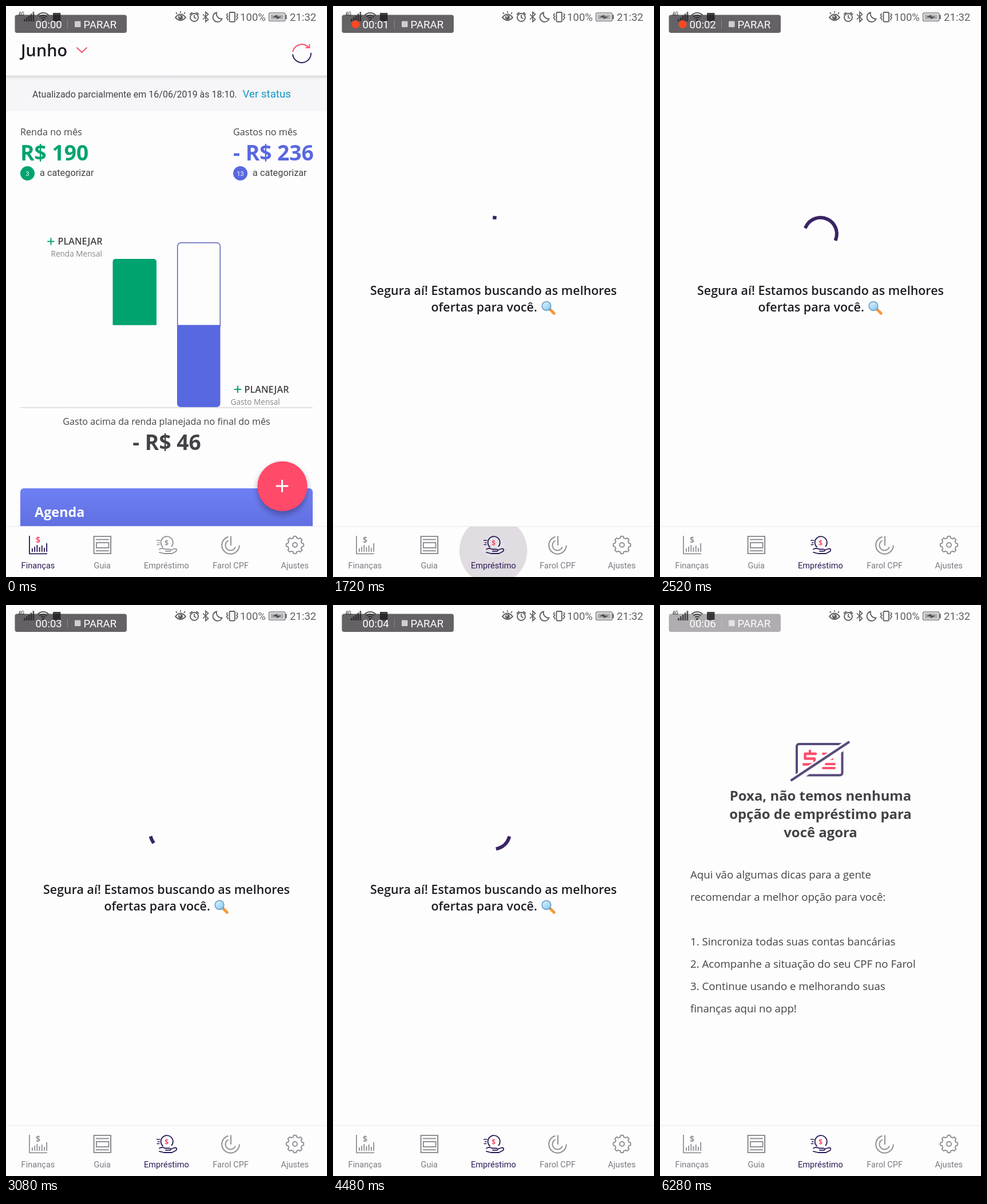
An HTML page with a canvas for the animation above (6.32 s loop, 561 px wide and 998 px high).

```html
<!DOCTYPE html>
<html lang="pt-BR">
<head>
<meta charset="utf-8">
<title>Finanças</title>
<style>
html, body { margin: 0; width: 100%; height: 100%; overflow: hidden; background: #fefdfe; }
canvas { display: block; width: 561px; height: 998px; }
</style>
</head>
<body>
<canvas id="stage"></canvas>
<script>
const W = 561, H = 998, LOOP = 6320, STEP = 40;
const PAGE_AT = 1680, SPIN_AT = 1700, STALL_AT = 4520, RESULT_AT = 4600;
const OPEN = '"Open Sans", "Noto Sans", sans-serif';
const ROBOTO = 'Roboto, "Noto Sans", sans-serif';
const PAPER = '#fefdfe', INK = '#444246', NAVY = '#2c1a55', PINK = '#ff4a69';
const GREEN = '#00a36f', BLUE = '#5868e0', GRAY = '#919095', STATUS = '#625f64';

const canvas = document.getElementById('stage');
const dpr = window.devicePixelRatio || 1;
canvas.width = W * dpr;
canvas.height = H * dpr;
const c = canvas.getContext('2d');
c.scale(dpr, dpr);

const clamp = v => Math.max(0, Math.min(1, v));

function text(str, x, y, size, color = INK, family = OPEN, weight = 400, align = 'left') {
  c.font = `${weight} ${size}px ${family}`;
  c.textAlign = align;
  c.fillStyle = color;
  c.fillText(str, x, y);
}
function line(d, color, width = 2, cap = 'butt') {
  c.strokeStyle = color;
  c.lineWidth = width;
  c.lineCap = cap;
  c.lineJoin = cap === 'butt' ? 'miter' : 'round';
  c.stroke(new Path2D(d));
}
function fill(d, color) {
  c.fillStyle = color;
  c.fill(new Path2D(d));
}
function rect(x, y, w, h, color, r = 0) {
  c.beginPath();
  c.roundRect(x, y, w, h, r);
  c.fillStyle = color;
  c.fill();
}
function frame(x, y, w, h, color, width, r = 0) {
  c.beginPath();
  c.roundRect(x, y, w, h, r);
  c.strokeStyle = color;
  c.lineWidth = width;
  c.stroke();
}
function disc(x, y, r, color) {
  c.beginPath();
  c.arc(x, y, r, 0, 7);
  c.fillStyle = color;
  c.fill();
}
function arc(x, y, r, from, to, color, width = 2, cap = 'butt') {
  const rad = Math.PI / 180;
  c.beginPath();
  c.arc(x, y, r, from * rad, to * rad);
  c.strokeStyle = color;
  c.lineWidth = width;
  c.lineCap = cap;
  c.stroke();
}
function plus(x, y, r, color, width) {
  line(`M${x - r} ${y}H${x + r}M${x} ${y - r}V${y + r}`, color, width);
}

function statusBar() {
  text('4G', 21.5, 17, 8.5, '#4a484c', ROBOTO, 500);
  for (let i = 0; i < 5; i++) rect(31 + i * 3.9, 23 - i * 3.2, 2.7, 4 + i * 3.2, '#5a585c');
  for (const r of [13, 9, 5]) arc(65, 25, r, -137, -43, '#5a585c', 2);
  disc(65, 24.5, 2, '#5a585c');
  rect(82, 12, 13.5, 14.5, '#444246', 1);

  line('M296 20Q305 9 314 20Q305 30 296 20Z', STATUS, 1.9);
  disc(305, 20, 4, STATUS);
  disc(304, 18.5, 1.2, PAPER);
  line('M299 14L297 11M305 12V9M311 14L313 11', STATUS, 1.6);

  arc(329, 20, 7, 0, 360, STATUS, 1.9);
  line('M329 15.5V20.5L332.5 22M321 15L325.5 11M337 15L332.5 11', STATUS, 1.8);
  line('M344 14.5L353.5 23.5L349 27.5V10.5L353.5 14.5L344 23.5', STATUS, 1.7);
  line('M368 11.5A8.2 8.2 0 1 0 377.5 22.5A9 9 0 0 1 368 11.5Z', STATUS, 1.9);

  frame(390.5, 11, 9.5, 16.5, STATUS, 1.9, 1.5);
  line('M387.5 13L385.5 15.5L387.5 18L385.5 20.5L387.5 23V25M403 13L405 15.5L403 18L405 20.5L403 23V25', STATUS, 1.7);

  text('100%', 409, 26, 18.6, STATUS, ROBOTO);
  frame(459.7, 12.2, 28, 14, STATUS, 1.3, 2);
  rect(462, 14.3, 23.5, 9.8, '#b5b3b7');
  rect(488.5, 15.5, 2.2, 7.5, STATUS);
  fill('M465 19.5L474 15.5V18.2L482 18.8L473 23V20.2Z', '#4f4d51');
  text('21:32', 496, 26, 18.6, STATUS, ROBOTO);
}

// Only the plate fades; its white text keeps full strength.
function recorder(t) {
  const phase = (t + 60) % 1010, sec = Math.floor((t + 60) / 1010);
  c.globalAlpha = clamp(1 - (t - 6140) / 290);
  rect(15.5, 15.5, 195.5, 31.5, 'rgba(32,29,32,.69)', 4);
  if (phase > 500) disc(39.5, 32, 7, '#ff4722');
  c.globalAlpha = 1;
  text('00:0' + sec, 51.5, 38.5, 18.6, '#fff', ROBOTO);
  rect(107, 24, 1, 15, 'rgba(255,255,255,.25)');
  rect(120, 26.5, 10.5, 10.5, t > 6140 ? '#e4e2e5' : '#cfcdd0', 1);
  text('PARAR', 135.5, 38.5, 18.6, '#fff', ROBOTO);
}

function summary(x, title, amount, count, color) {
  text(title, x, 226, 16.2);
  text(amount, x, 270, 37.2, color, OPEN, 700);
  disc(x + 12.5, 292.5, 12.5, color);
  text(count, x + 12.5, 296.5, 10.8, '#fff', ROBOTO, 400, 'center');
  text('a categorizar', x + 34, 297, 16.3, INK, ROBOTO);
}

function financePage() {
  text('Junho', 26, 88, 28.8, '#1f1d22', OPEN, 600);
  line('M123.5 72.5L132.5 81L141.5 72.5', '#f2566f', 2);
  arc(517, 83, 16, 190, 322, PINK, 1.9);
  line('M530.3 66.5V72.8H523.5', PINK, 1.9);
  arc(517, 83, 16, -4, 176, NAVY, 1.9);

  rect(0, 122, W, 62, '#f6f5f7');
  const shade = c.createLinearGradient(0, 121, 0, 128);
  shade.addColorStop(0, '#d6d4d8');
  shade.addColorStop(1, '#f6f5f7');
  rect(0, 121.5, W, 6.5, shade);
  text('Atualizado parcialmente em 16/06/2019 às 18:10.', 46, 160, 16.05, INK, ROBOTO);
  text('Ver status', 413.5, 160, 18.7, '#0f98c6', ROBOTO);

  summary(25, 'Renda no mês', 'R$ 190', '3', GREEN);
  summary(397, 'Gastos no mês', '- R$ 236', '13', BLUE);

  plus(78.5, 411.5, 6.2, GREEN, 2);
  text('PLANEJAR', 90.5, 417, 16.2, INK, OPEN, 600);
  text('Renda Mensal', 168, 438, 13.6, '#88868a', OPEN, 400, 'right');
  rect(186.5, 442, 76.5, 115.7, GREEN, [5, 5, 0, 0]);
  frame(299.7, 413.8, 74.6, 146, '#5a63b5', 1.5, [6, 6, 0, 0]);
  rect(299, 557.5, 75.5, 143.5, BLUE, [0, 0, 6, 6]);
  plus(405, 670, 6.2, GREEN, 2);
  text('PLANEJAR', 416.5, 676, 16.2, INK, OPEN, 600);
  text('Gasto Mensal', 392.5, 696.5, 13.6, '#88868a');
  rect(25, 701.2, 511, 1.6, '#d9d7dc');

  text('Gasto acima da renda planejada no final do mês', 280.5, 732, 16.15, INK, OPEN, 400, 'center');
  text('- R$ 46', 281, 776, 37.2, INK, OPEN, 700, 'center');

  const card = c.createLinearGradient(0, 843, 0, 912);
  card.addColorStop(0, '#6f80f5');
  card.addColorStop(1, '#5f6fe0');
  rect(25, 843, 511, 80, card, 6);
  text('Agenda', 50, 892.5, 23.4, '#fff', OPEN, 700);

  c.save();
  c.shadowColor = 'rgba(30,20,60,.4)';
  c.shadowBlur = 11 * dpr;
  c.shadowOffsetY = 6 * dpr;
  disc(483, 839.3, 43.6, PINK);
  c.restore();
  plus(482.5, 839, 10.8, '#fff', 3);
}

// Eased share of a cubic with control heights 0 and 1.
function ease(x, x0, x1, x2, x3) {
  if (x <= x0) return 0;
  if (x >= x3) return 1;
  let lo = 0, hi = 1, u;
  for (let i = 0; i < 24; i++) {
    u = (lo + hi) / 2;
    const v = 1 - u;
    const at = x0 * v * v * v + 3 * x1 * u * v * v + 3 * x2 * u * u * v + x3 * u * u * u;
    if (at < x) lo = u; else hi = u;
  }
  return u * u * (3 - 2 * u);
}

function spinner(t) {
  if (t < SPIN_AT) return;
  const time = Math.min(t, STALL_AT);
  const run = time - 1655 - 50 * clamp(1 - (time - 1720) / 80);
  const p = run % 1333 / 1333;
  const turn = run * 720 / 4444 + p * 90 - 90;
  const head = 270 * ease(p, 0, .2, .1, .5);
  const tail = 270 * ease(p, .5, .7, .6, 1);
  arc(280.5, 398.2, 28.4, turn + tail, turn + Math.max(head, tail + 1), '#3a2463', 6, 'square');
}

function loadingPage(t) {
  spinner(t);
  text('Segura aí! Estamos buscando as melhores', 280.5, 505, 21.45, '#1f1d22', OPEN, 600, 'center');
  text('ofertas para você.', 171.5, 534, 21.45, '#1f1d22', OPEN, 600);
  line('M379 530L386.3 537.2', '#f39a35', 5, 'round');
  line('M377 528L380 531', '#8a98a8', 3);
  disc(373, 524.3, 8.6, '#6c9fc8');
  const glass = c.createLinearGradient(368, 518, 378, 531);
  glass.addColorStop(0, '#d4f0fd');
  glass.addColorStop(1, '#8ccbf2');
  disc(373, 524.3, 6.9, glass);
}

function resultPage() {
  const violet = '#584a7a';
  frame(239, 243, 79.5, 54.5, violet, 4, 4);
  line('M272 260H253.5V268.5H270V278.5H251M262 255V260M262 278.5V283', '#fb4f6b', 4.4, 'round');
  line('M285 260H301M285 269H301M290 278H305M285 285H305', '#fb4f6b', 4, 'round');
  line('M228 310L333 239', PAPER, 13);
  line('M228.5 307L331 239', violet, 4.2);

  ['Poxa, não temos nenhuma', 'opção de empréstimo para', 'você agora'].forEach((s, i) =>
    text(s, 280.5, 342 + i * 32.2, 23.9, INK, OPEN, 700, 'center'));
  ['Aqui vão algumas dicas para a gente',
    'recomendar a melhor opção para você:', '',
    '1. Sincroniza todas suas contas bancárias',
    '2. Acompanhe a situação do seu CPF no Farol',
    '3. Continue usando e melhorando suas',
    'finanças aqui no app!'].forEach((s, i) => text(s, 53, 478 + i * 39, 18.65));
}

function chartIcon(ink, accent) {
  line('M41 926V957.3H72', ink, 1.8);
  [6, 9, 12, 8, 11, 7, 15].forEach((h, i) => rect(45 + i * 4.2, 954 - h, 1.9, h, ink));
  text('$', 56, 937.5, 14, accent, OPEN, 700, 'center');
}
function guideIcon(ink) {
  frame(153.6, 927, 29.5, 30, ink, 2.2);
  line('M157 932.5H180M157 952.3H180', ink, 2);
  frame(158, 938, 21.5, 9, ink, 2);
}
function loanIcon(ink, accent) {
  line('M274.5 946A10.6 10.6 0 1 1 289 945', ink, 1.8);
  line('M263 934H269.5M265 938H268.5M263.5 941.5H268.5', ink, 1.6);
  text('$', 280.7, 942.5, 12, accent, OPEN, 700, 'center');
  line('M268 949.5Q273 946.5 278 949.5H286Q290 951 287 952.8H279M289 950.5L295 948.5Q300 948.8 297.5 953L290 957H276L268 954.8', ink, 1.8, 'round');
}
function dialIcon(ink) {
  arc(392.5, 942.5, 15.3, 0, 255, ink, 2);
  arc(392.5, 942.5, 9, 20, 245, ink, 2);
  line('M393 926.5V943', ink, 2);
}
function gearIcon(ink) {
  c.beginPath();
  for (let a = 0; a <= 360; a += 3) {
    const wave = Math.cos(a * 8 * Math.PI / 180);
    const r = 13.6 + 1.6 * clamp(.5 + wave * 1.6) - 1.2 * clamp(.5 - wave * 1.6);
    c.lineTo(505 + r * Math.sin(a * Math.PI / 180), 942 - r * Math.cos(a * Math.PI / 180));
  }
  c.closePath();
  c.strokeStyle = ink;
  c.lineWidth = 2;
  c.lineJoin = 'round';
  c.stroke();
  arc(505, 942, 4, 0, 360, ink, 2);
}

function ripple(t) {
  const grow = clamp((t - 1500) / 200), fade = clamp(1 - (t - 1740) / 360);
  if (!grow || !fade) return;
  c.save();
  c.beginPath();
  c.rect(0, 910, W, 88);
  c.clip();
  c.globalAlpha = Math.min(1, grow * 1.5) * fade;
  disc(280.2, 952, 18 + 41.3 * (1 - (1 - grow) ** 2), '#e0dce1');
  disc(280.5, 946, 19, '#e5e2e6');
  c.restore();
}

function navBar(t) {
  const loan = t >= PAGE_AT;
  rect(0, 909, W, 89, PAPER);
  rect(0, 909, W, 1.3, '#eeecef');
  ripple(t);
  const main = loan ? GRAY : NAVY, second = loan ? NAVY : GRAY;
  chartIcon(main, loan ? GRAY : PINK);
  guideIcon(GRAY);
  loanIcon(second, loan ? PINK : GRAY);
  dialIcon(GRAY);
  gearIcon(GRAY);
  ['Finanças', 'Guia', 'Empréstimo', 'Farol CPF', 'Ajustes'].forEach((s, i) => {
    const on = i === (loan ? 2 : 0);
    text(s, 56 + i * 112.2, 982.5, 14.6, on ? NAVY : '#7c7a80', ROBOTO, 400, 'center');
  });
}

const start = performance.now();
function draw() {
  const t = Math.floor((performance.now() - start) % LOOP / STEP) * STEP;
  rect(0, 0, W, H, PAPER);
  if (t < PAGE_AT) financePage();
  else if (t < RESULT_AT) loadingPage(t);
  else resultPage();
  navBar(t);
  statusBar();
  recorder(t);
  requestAnimationFrame(draw);
}
draw();
</script>
</body>
</html>
```
